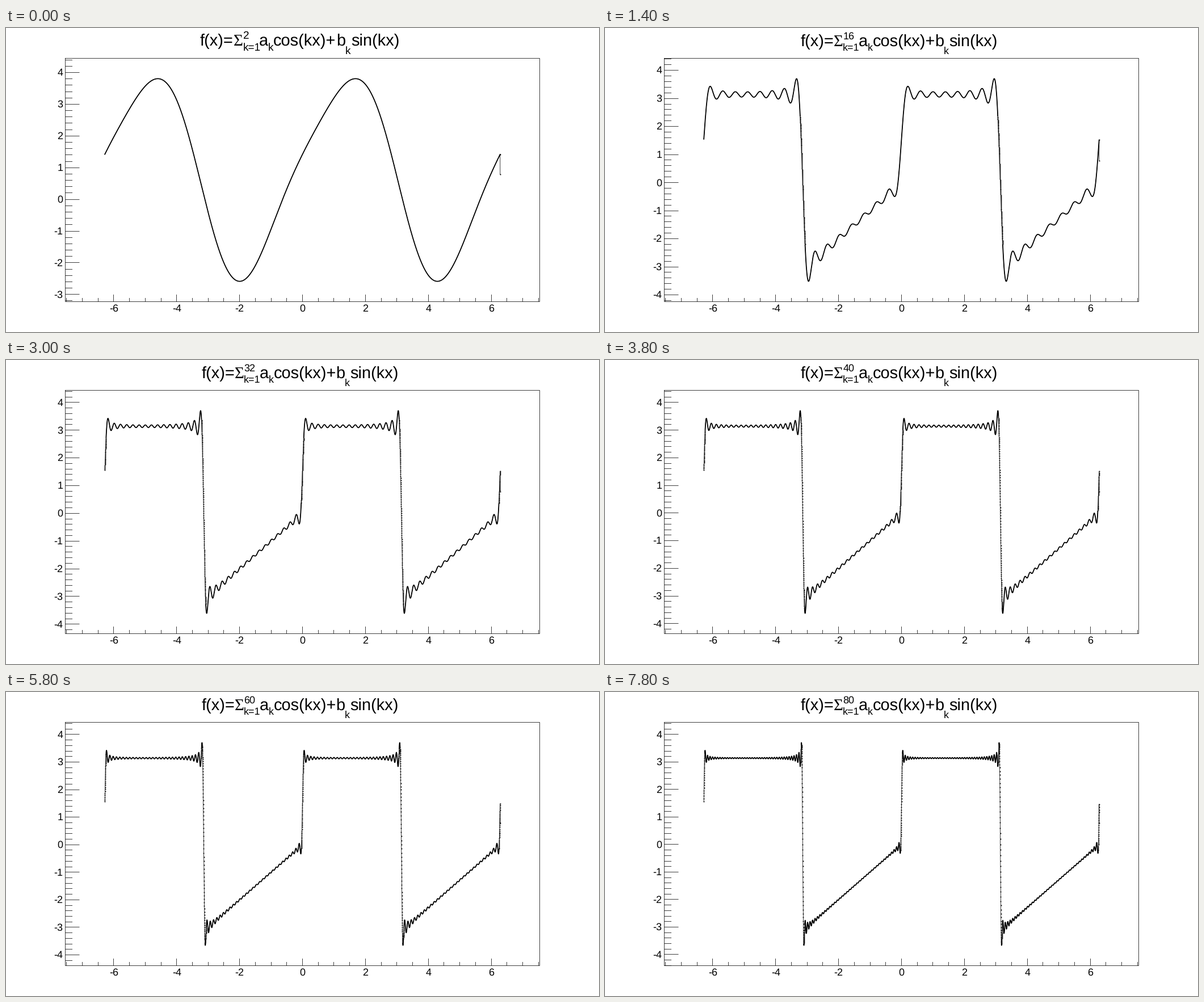
Write a matplotlib script that moves like this. It is 1045 px wide and 536 px high and loops after 8000 ms.

```python
import math

import matplotlib.pyplot as plt
import numpy as np
from matplotlib.animation import FuncAnimation
from matplotlib.collections import LineCollection

W, H, DPI = 1045, 536, 64
PX = 72 / DPI  # points per pixel
LEFT, RIGHT, TOP, BOTTOM = 0.1 * W, 0.9 * W, 0.1 * H, 0.9 * H
FRAMES, INTERVAL = 40, 200
X_MAX = 2.4 * math.pi
POINTS = 10000
HAIR = 0.75 * PX
TITLE_SIZE, LABEL_SIZE = 29.4, 17.5
SANS, SERIF = "Liberation Sans", "Liberation Serif"

plt.rcParams["text.hinting"] = "none"
plt.rcParams["text.hinting_factor"] = 1

x = np.linspace(-2 * math.pi, 2 * math.pi, POINTS + 1)


def harmonic(k):
    """One term of the series of x on (-pi, 0) and pi on (0, pi)."""
    sign = (-1) ** k
    a = (1 - sign) / (math.pi * k * k)
    b = (1 - 2 * sign) / k
    return a * np.cos(k * x) + b * np.sin(k * x)


curves = []
total = np.full_like(x, math.pi / 4)
for step in range(1, FRAMES + 1):
    total = total + harmonic(2 * step - 1) + harmonic(2 * step)
    curve = total.copy()
    curve[-1] = math.pi / 4  # the last point keeps only the mean
    curves.append(curve)


def to_px(v):
    return W / 2 + v * (RIGHT - LEFT) / (2 * X_MAX)


fig = plt.figure(figsize=(W / DPI, H / DPI), dpi=DPI, facecolor="white")
ax = fig.add_axes([0, 0, 1, 1])
ax.set_xlim(0, W)
ax.set_ylim(H, 0)
ax.axis("off")


def label(px, py, text, size, font=SANS, ha="left"):
    return ax.text(px, py, text, fontsize=size * PX, family=font,
                   ha=ha, va="baseline", color="black")


def hairlines(segments):
    return ax.add_collection(LineCollection(
        segments, colors="black", linewidths=HAIR, snap=False))


# hairlines run through pixel centres
def crisp(v):
    return math.floor(v) + 0.5


x0, x1, y0, y1 = map(crisp, (LEFT, RIGHT, TOP, BOTTOM))
ax.plot([x0, x1, x1, x0, x0], [y0, y0, y1, y1, y0], color="black",
        lw=HAIR, solid_joinstyle="miter", snap=False)

x_ticks = []
for i in range(-15, 16):
    tx = crisp(to_px(i / 2))
    x_ticks.append([(tx, y1), (tx, y1 - (12.5 if i % 4 == 0 else 6.5))])
    if i % 4 == 0:
        label(to_px(i / 2), 500, str(i // 2), LABEL_SIZE, ha="center")
hairlines(x_ticks)
y_ticks = hairlines([])
y_labels = {v: label(100.3, 0, str(v), LABEL_SIZE, ha="right")
            for v in range(-5, 6)}

# A hairline joins all points; close points merge into a bold stroke,
# points far apart stay single dots.
thin, = ax.plot([], [], color="black", lw=HAIR, snap=False)
bold, = ax.plot([], [], color="black", lw=1.75 * PX, snap=False)
dots, = ax.plot([], [], ls="", color="black", marker="o", ms=2 * PX, mew=0)

# Title parts: pen position, role, text, font
PARTS = [
    (342, "main", "f(x)=", SANS),
    (401, "main", "\u03a3", SERIF),
    (417.5, "sup", "", SANS),
    (417.5, "sub", "k=1", SANS),
    (445.5, "main", "a", SANS),
    (461.5, "sub", "k", SANS),
    (471, "main", "cos(kx)+", SANS),
    (582, "main", "b", SANS),
    (597.8, "low", "k", SANS),
    (608, "main", "sin(kx)", SANS),
]
BASE_LARGE = {"main": 31, "sup": 19, "sub": 40, "low": 46}
BASE_SMALL = {"main": 32, "sup": 20, "sub": 40, "low": 46}
title = [label(px, 0, text, TITLE_SIZE, font) for px, _, text, font in PARTS]


def set_title(n):
    # digits with round feet make the title taller, so it is shrunk to fit
    large = set(str(n)) <= set("1247")
    scale = 1 if large else 0.983
    base = BASE_LARGE if large else BASE_SMALL
    for item, (px, role, _, _) in zip(title, PARTS):
        item.set_position((517.5 + (px - 517.5) * scale, base[role]))
        size = TITLE_SIZE * scale * (1 if role == "main" else 0.635)
        item.set_fontsize(size * PX)
        if role == "sup":
            item.set_text(str(n))


def draw(frame):
    y = curves[frame]
    margin = 0.1 * (y.max() - y.min())
    low, high = y.min() - margin, y.max() + margin

    def y_px(v):
        return BOTTOM - (v - low) * (BOTTOM - TOP) / (high - low)

    px, py = to_px(x), y_px(y)
    gap = np.abs(np.diff(py, append=py[-1]))
    sparse = (gap > 1.5) | (np.roll(gap, 1) > 1.5)
    thin.set_data(px, py)
    bold.set_data(px, np.where(sparse, np.nan, py))
    dots.set_data(px[sparse], py[sparse])

    ticks = []
    for i in range(math.ceil(low * 5), math.floor(high * 5) + 1):
        ty = crisp(y_px(i / 5))
        ticks.append([(x0, ty), (x0 + (25 if i % 5 == 0 else 12.5), ty)])
    y_ticks.set_segments(ticks)
    for v, text in y_labels.items():
        text.set_visible(low <= v <= high)
        text.set_y(y_px(v) + 5.8)
    set_title(2 * (frame + 1))
    return [thin, bold, dots, y_ticks, *y_labels.values(), *title]


anim = FuncAnimation(fig, draw, frames=FRAMES, interval=INTERVAL,
                     repeat=True, repeat_delay=0, blit=False)
plt.show()
```
